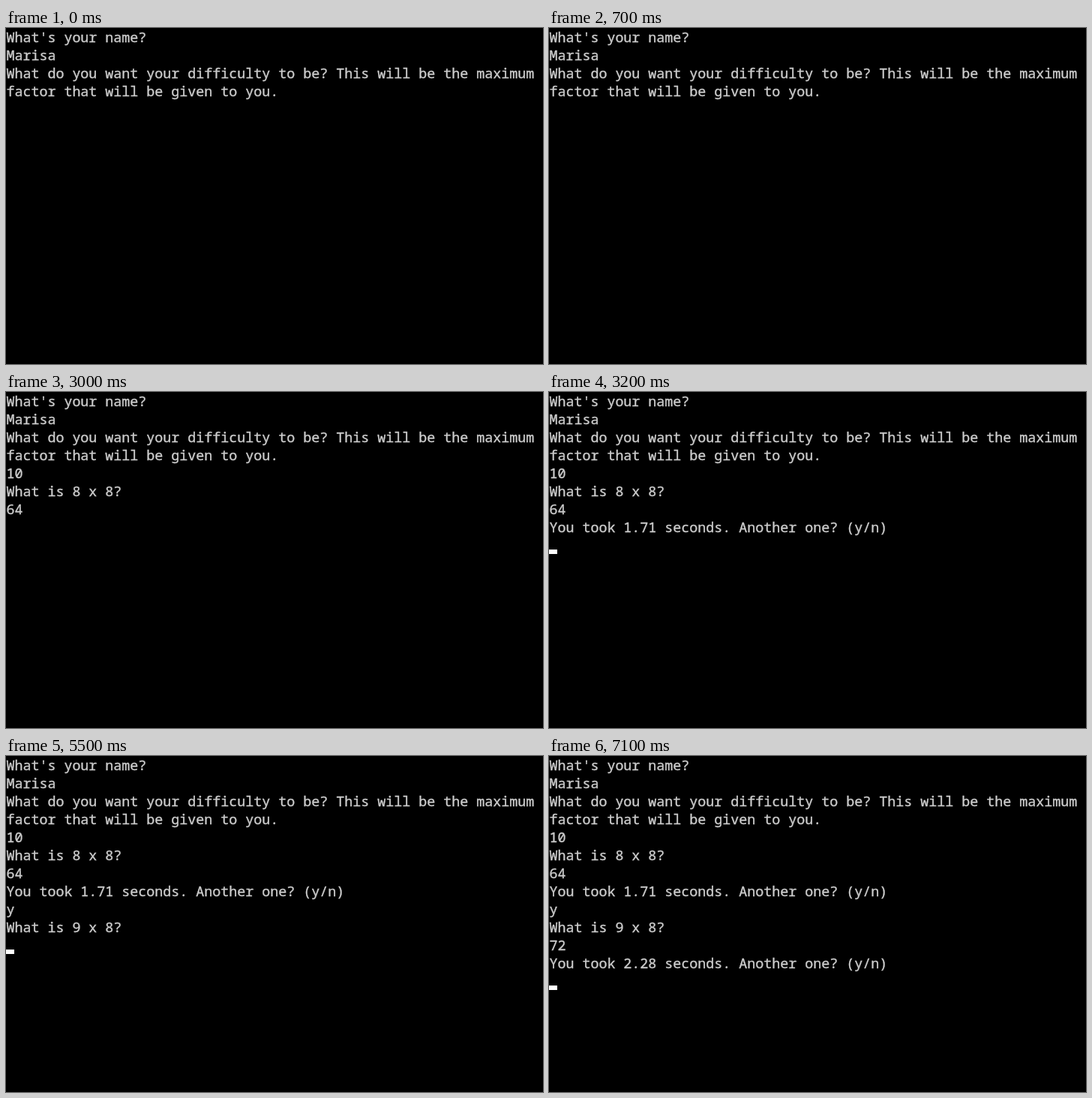
These frames come from a looping animation (716x448 px, 7200 ms). An HTML page:

```html
<!DOCTYPE html>
<html lang="en">
<head>
<meta charset="utf-8">
<title>Times table quiz</title>
<style>
  html, body { margin: 0; width: 100%; height: 100%; overflow: hidden; background: #000; }
  #screen {
    position: absolute; left: 0; top: 0; margin: 0;
    font: 18.34px/24px "Noto Sans Mono", "DejaVu Sans Mono", monospace;
    font-variant-ligatures: none;
    color: #ccc; white-space: pre;
    -webkit-text-stroke: 0.4px #ccc;
    transform: translateX(0.4px);
  }
  #cursor { position: absolute; width: 11px; height: 6px; background: #fff; }
</style>
</head>
<body>
<pre id="screen"></pre>
<div id="cursor"></div>
<script>
const LOOP = 7200, CELL = 11, LINE = 24;

const intro = "What's your name?\nMarisa\n" +
  "What do you want your difficulty to be? This will be the maximum\n" +
  "factor that will be given to you.\n";
const ask = (a, b) => `\nWhat is ${a} x ${b}?\n`;
const took = s => `\nYou took ${s} seconds. Another one? (y/n)\n`;

// [time in ms, text added to the console]
const output = [
  [0, intro],
  [900, "1"], [1000, "0"],
  [1500, ask(8, 8)],
  [2700, "64"],
  [3100, took("1.71")],
  [3900, "y"], [4000, ask(9, 8)],
  [5900, "7"], [6000, "2"],
  [6300, took("2.28")]
];

// [on, off] spans of the blinking cursor
const blinks = [
  [100, 700], [1200, 2400], [3100, 3900],
  [4000, 4600], [5100, 5600], [6300, LOOP]
];

const screen = document.getElementById("screen");
const cursor = document.getElementById("cursor");
const start = performance.now();
let shown = "";

function draw(t) {
  const text = output.filter(([at]) => at <= t).map(([, s]) => s).join("");
  if (text !== shown) screen.textContent = shown = text;

  const lines = text.split("\n");
  cursor.style.left = lines[lines.length - 1].length * CELL + "px";
  cursor.style.top = lines.length * LINE - 6 + "px";
  cursor.hidden = !blinks.some(([on, off]) => t >= on && t < off);
}

function tick() {
  draw((performance.now() - start) % LOOP);
  requestAnimationFrame(tick);
}
tick();
</script>
</body>
</html>
```
